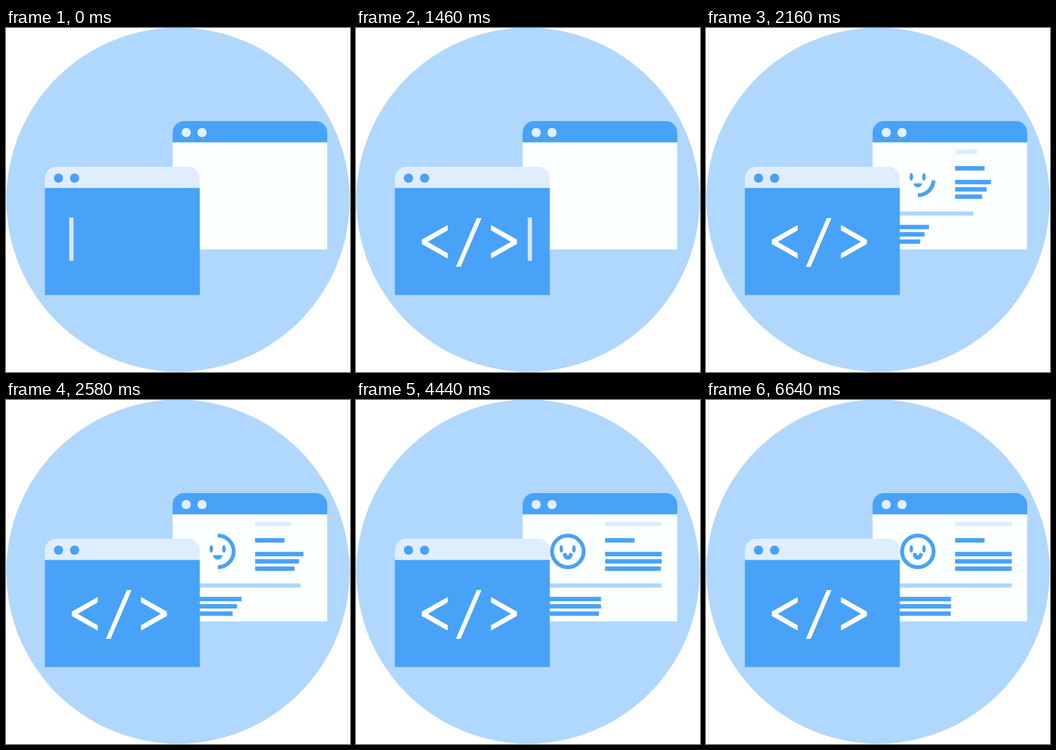
Recreate the animation shown at these times as an HTML page. Size 544x543 px, loop 6.84 s.

```html
<!DOCTYPE html>
<html lang="en">
<head>
<meta charset="utf-8">
<title>Code to page</title>
<style>
  html, body { margin: 0; width: 100%; height: 100%; overflow: hidden; background: #fff; }
  svg { display: block; width: 100vw; height: 100vh; }
</style>
</head>
<body>
<svg viewBox="0 0 544 543" fill="#48a2f7">
  <circle cx="272" cy="271" r="271.5" fill="#b0d7fd"/>

  <g id="page">
    <path d="M263.5 181V165a18 18 0 0 1 18-18H490a18 18 0 0 1 18 18V181z"/>
    <path d="M263.5 180.5H508V349.5H263.5z" fill="#fbffff"/>
    <g fill="#e0efff"><circle cx="285" cy="165" r="7.3"/><circle cx="310" cy="165" r="7.3"/></g>
    <g id="bars"></g>
    <path id="ring" d="M335 264a25 25 0 0 0 0-50a25 25 0 0 0 0 50" pathLength="1"
      fill="none" stroke="#48a2f7" stroke-width="6"/>
    <ellipse class="eye" cx="324.7" cy="235" rx="2.8" ry="6"/>
    <ellipse class="eye" cx="344.7" cy="235" rx="2.8" ry="6"/>
    <g id="mouth">
      <path d="M327.5 245H342.5C342 249 339 252 335 252S328 249 327.5 245z"/>
      <circle id="rightCheek" cx="339.6" cy="244.2" r="3"/>
      <circle id="leftCheek" cx="330.4" cy="244.2" r="3"/>
    </g>
  </g>

  <g id="editor">
    <path d="M61.5 253V237a18 18 0 0 1 18-18H288.5a18 18 0 0 1 18 18V253z" fill="#dfeeff"/>
    <path d="M61.5 252.5H306.5V421.5H61.5z"/>
    <circle cx="83" cy="237" r="7.3"/><circle cx="108.5" cy="237" r="7.3"/>
    <g fill="#fff">
      <path class="glyph" d="M104 334L145 311V319.5L113.5 337.5L145 355.5V364L104 341z"/>
      <path class="glyph" d="M158 377H165.5L198.5 300H191z"/>
      <path class="glyph" d="M254.5 334L213.5 311V319.5L245 337.5L213.5 355.5V364L254.5 341z"/>
    </g>
    <rect id="cursor" y="299" width="6.7" height="68.5" fill="#dde5ee"/>
  </g>
</svg>
<script>
const LOOP = 6840;
const TYPED_AT = [500, 900, 1320];
const $ = id => document.getElementById(id);
const clamp = (v, max = 1) => Math.max(0, Math.min(max, v));
const ramp = (t, from, to) => clamp((t - from) / (to - from));
const decay = (t, start, rate) => 1 - Math.exp(-Math.max(0, t - start) * rate);

// Piecewise linear value through [time, value] points.
function track(t, points) {
  let value = points[0][1];
  for (let i = 1; i < points.length; i++) {
    value += (points[i][1] - points[i - 1][1]) * ramp(t, points[i - 1][0], points[i][0]);
  }
  return value;
}

const sweep = t => 105 * decay(t, 1540, 0.00125);

const bars = [];
function addBar(x, y, width, height, reveal, fill = '#48a2f7') {
  const rect = document.createElementNS('http://www.w3.org/2000/svg', 'rect');
  for (const [key, value] of Object.entries({ x, y, height, fill })) rect.setAttribute(key, value);
  $('bars').append(rect);
  bars.push({ rect, width, reveal });
}

addBar(394, 192, 89.5, 7, t => 93 * decay(t, 1760, 0.00116), '#dfeefe');
addBar(394, 218, 46.5, 7, t => sweep(t) - 3);
addBar(298, 289.5, 185.5, 6.7, t => 2.2 * sweep(t), '#b0d7fd');
for (let row = 0; row < 3; row++) {
  addBar(394, 239.7 + row * 11.5, 89.5, 7, t => sweep(t) - 7 * row);
  addBar(298, 310.7 + row * 11.5, 89.5, 7, t => sweep(t) - 2 - 7 * row);
}

const scaleAt = (x, y, s) => `translate(${x} ${y}) scale(${s}) translate(${-x} ${-y})`;

function draw(t) {
  const typed = TYPED_AT.filter(at => t >= at).length;
  document.querySelectorAll('.glyph').forEach((glyph, i) => {
    glyph.setAttribute('visibility', i < typed ? 'visible' : 'hidden');
  });
  $('cursor').setAttribute('x', 100 + typed * 57.2);
  $('cursor').setAttribute('opacity', 1 - ramp(t, 1660, 1860));

  for (const { rect, width, reveal } of bars) rect.setAttribute('width', clamp(reveal(t), width));

  const ringLength = track(t, [[1780, 0], [2580, 0.5], [3460, 0.76], [4300, 1]]);
  $('ring').setAttribute('stroke-dasharray', `${ringLength} 2`);
  $('ring').setAttribute('visibility', ringLength ? 'visible' : 'hidden');

  document.querySelectorAll('.eye').forEach(eye => {
    eye.setAttribute('transform', scaleAt(eye.getAttribute('cx'), 235, ramp(t, 1560, 1750)));
  });
  $('mouth').setAttribute('transform', scaleAt(335, 247, ramp(t, 1800, 2200)));
  $('rightCheek').setAttribute('r', 3 * ramp(t, 2700, 3400));
  $('leftCheek').setAttribute('r', 3 * ramp(t, 3460, 4200));
}

const start = performance.now();
function tick() {
  draw((performance.now() - start) % LOOP);
  requestAnimationFrame(tick);
}
tick();
</script>
</body>
</html>
```
